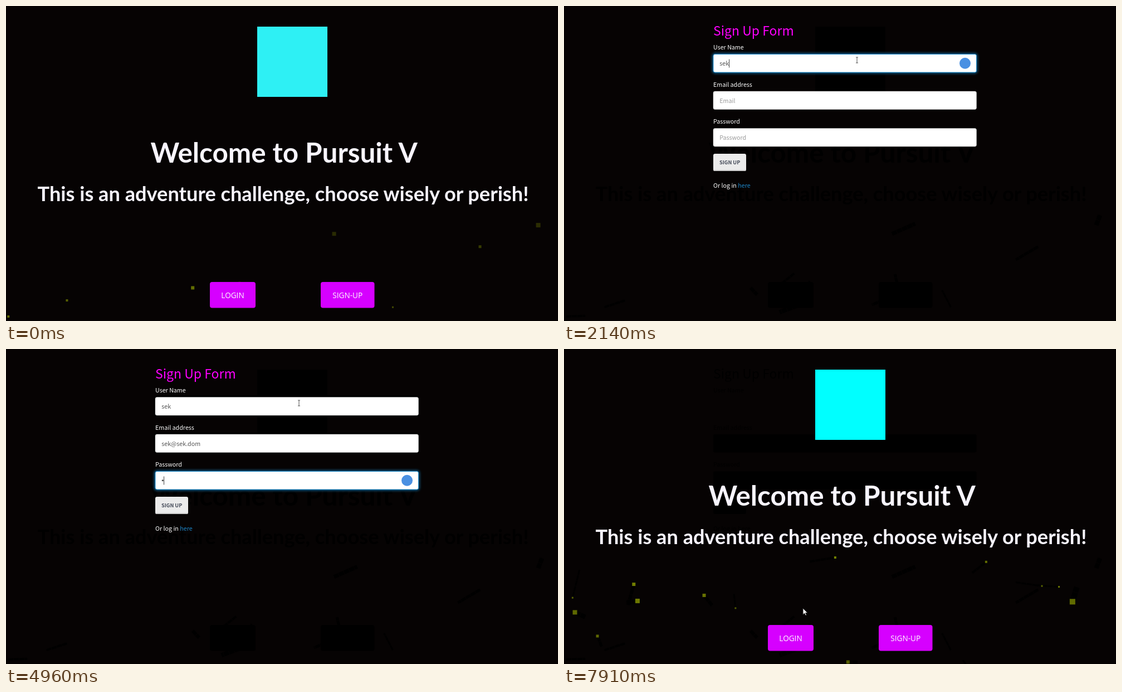
Animation of 991 by 565 pixels, one loop 7990 ms. Source, as an HTML page:

```html
<!DOCTYPE html>
<html lang="en">
<head>
<meta charset="utf-8">
<title>Sign up</title>
<style>
  html, body { margin: 0; width: 100%; height: 100%; overflow: hidden; background: #060303; }
  svg { display: block; width: 100%; height: 100%; }
  .head { font-family: Lato, "Open Sans", sans-serif; font-weight: 700; }
  .btn { font: 500 13.6px "Open Sans", "Noto Sans", sans-serif; text-anchor: middle; }
  .form { font: 10.7px "Noto Sans CJK JP", "Noto Sans CJK SC", "Noto Sans CJK", "Open Sans", sans-serif; }
  .form .title { font-size: 23px; }
  .form .submit { font-size: 9.2px; font-weight: 700; text-anchor: middle; }
</style>
</head>
<body>
<svg id="stage" viewBox="0 0 991 565">
  <defs>
    <clipPath id="sky"><rect y="372" width="991" height="193"/></clipPath>
    <filter id="blur" x="-5%" y="-50%" width="110%" height="200%"><feGaussianBlur stdDeviation="2"/></filter>
  </defs>
</svg>
<script>
const LOOP = 7990, FORM_AT = 900, HOME_AT = 6920;
const stage = document.getElementById('stage');

const set = (node, attrs) => { for (const key in attrs) node.setAttribute(key, attrs[key]); };
const show = (node, on) => node.setAttribute('visibility', on ? 'inherit' : 'hidden');
const clamp = v => Math.max(0, Math.min(1, v));
const mix = (a, b, k) => a + (b - a) * k;
const smooth = k => k * k * (3 - 2 * k);

function el(parent, tag, attrs = {}, text) {
  const node = document.createElementNS('http://www.w3.org/2000/svg', tag);
  set(node, attrs);
  if (text !== undefined) node.textContent = text;
  return parent.appendChild(node);
}

const trails = el(stage, 'g', { 'clip-path': 'url(#sky)', stroke: '#000' });
const ghostHome = el(stage, 'g');
const ghostForm = el(stage, 'g', { class: 'form' });
const specks = el(stage, 'g', { 'clip-path': 'url(#sky)', fill: '#98aa00' });
const homeLayer = el(stage, 'g');
const formLayer = el(stage, 'g', { class: 'form' });

// Landing page; a tint gives its dark afterimage
const loginBox = { x: 366, y: 495, width: 82, height: 46.5, rx: 4 };
const joinBox = { ...loginBox, x: 565, width: 96.5 };

function buildHome(layer, tint) {
  const heading = (x, y, size, text) =>
    el(layer, 'text', { class: 'head', x, y, 'font-size': size, fill: tint || '#f8f5ff' }, text);
  const button = (box, label) => {
    const node = el(layer, 'rect', { ...box, fill: tint || '#d600ff' });
    if (!tint) el(layer, 'text', { class: 'btn', x: box.x + box.width / 2, y: 524, fill: '#fff' }, label);
    return node;
  };
  heading(259.5, 281, 49.4, 'Welcome to Pursuit V');
  heading(56.5, 349.5, 36.2, 'This is an adventure challenge, choose wisely or perish!');
  button(loginBox, 'LOGIN');
  return {
    logo: el(layer, 'rect', { x: 451, y: 37, width: 126, height: 126, fill: tint || '#0ff' }),
    join: button(joinBox, 'SIGN-UP')
  };
}
buildHome(ghostHome, '#000');
const home = buildHome(homeLayer);

// Drifting squares, each leaving a dark trail
function seeded(seed) {
  return () => (seed = seed * 16807 % 2147483647) / 2147483647;
}
function swarm(seed, start, end) {
  const rnd = seeded(seed);
  const items = Array.from({ length: 14 }, () => {
    const size = Math.round(3 + 7 * rnd() ** 2), angle = rnd() * 2 * Math.PI, speed = .012 + .04 * rnd();
    return {
      size, x: rnd() * 991, y: 380 + rnd() * 185, glow: .2 + .45 * rnd(),
      vx: Math.cos(angle) * speed, vy: Math.sin(angle) * speed,
      trail: el(trails, 'line', { 'stroke-width': size, 'stroke-dasharray': '9 1' }),
      dot: el(specks, 'rect', { width: size, height: size })
    };
  });
  return t => {
    const age = Math.min(t, end) - start;
    for (const p of items) {
      const x = p.x + p.vx * age, y = p.y + p.vy * age;
      set(p.trail, { x1: p.x, y1: p.y, x2: x, y2: y });
      set(p.dot, { x: x - p.size / 2, y: y - p.size / 2, opacity: p.glow + age / 4000 });
      show(p.trail, age >= 0);
      show(p.dot, t >= start && t < end);
    }
  };
}
const swarms = [swarm(4711, 0, FORM_AT), swarm(2024, HOME_AT, LOOP)];

// Sign-up form; each burst is [text, time of first key, time per key]
const fields = [
  { label: 'User Name', hint: 'username', on: 1760, off: 2310, bursts: [['sek', 1840, 150]] },
  { label: 'Email address', hint: 'Email', on: 2310, off: 4730,
    bursts: [['sek', 2460, 160], ['@', 3160, 0], ['sek', 3640, 110], ['.dom', 4180, 137]] },
  { label: 'Password', hint: 'Password', on: 4730, off: 6520, secret: true, bursts: [['******', 4960, 172]] }
];
const TEXT_X = 279.3, BULLET = 3.75;

function typed(bursts, t) {
  return bursts.map(([text, start, step]) =>
    t < start ? '' : text.slice(0, 1 + Math.floor((t - start) / (step || 1)))).join('');
}

function buildField(f, i) {
  const y = 86.5 + 66.5 * i, mid = y + 16.3;
  const layer = el(formLayer, 'g');
  f.box = { x: 268, y, width: 472.5, height: 32.5, rx: 3 };
  if (i) el(ghostForm, 'rect', f.box);
  for (const [parent, fill] of [[layer, '#fff'], [ghostForm, '#000']])
    el(parent, 'text', { x: 268, y: y - 8.5, fill }, f.label);
  f.halo = el(layer, 'rect', { ...f.box, stroke: '#000', 'stroke-width': 6 });
  f.glow = el(layer, 'rect', { ...f.box, stroke: '#1f9be8', 'stroke-width': 4, filter: 'url(#blur)' });
  f.edge = el(layer, 'rect', { ...f.box, fill: '#fff' });
  f.value = el(layer, 'text', { x: TEXT_X, y: y + 20.5 });
  f.bullets = el(layer, 'line', { x1: TEXT_X + 1.9, y1: mid, y2: mid, stroke: '#444', 'stroke-width': 3,
    'stroke-linecap': 'round', 'stroke-dasharray': `0 ${BULLET}` });
  f.caret = el(layer, 'rect', { y: y + 9, width: 1, height: 15, fill: '#444' });
  f.badge = el(layer, 'circle', { cx: 720, cy: mid, r: 10, fill: '#4a90e2' });
}
fields.forEach(buildField);

function drawField(f, t) {
  const text = typed(f.bursts, t), n = text.length;
  const focus = t >= f.on && t < f.off;
  f.value.textContent = !n ? f.hint : f.secret ? '' : text;
  set(f.value, { fill: n ? '#555' : '#999' });
  set(f.bullets, { x2: TEXT_X + 2 + BULLET * (n - 1) });
  set(f.caret, { x: TEXT_X + (!n ? 0 : f.secret ? BULLET * n : f.value.getComputedTextLength()) });
  set(f.glow, { opacity: .6 * clamp((t - f.on) / 200) * clamp((f.off + 150 - t) / 150) });
  set(f.edge, { stroke: focus ? '#1f8fd0' : '#ccc', 'stroke-width': focus ? 1 : .5 });
  show(f.bullets, f.secret && n);
  show(f.halo, t >= f.on);
  show(f.caret, focus);
  show(f.badge, focus);
}

const submitBox = { x: 268, y: 265, width: 59, height: 31, rx: 3 };
const submit = el(formLayer, 'rect', submitBox);
el(formLayer, 'rect', { x: 268.5, y: 294, width: 58, height: 2, rx: 1, fill: '#cfcfcf' });
el(formLayer, 'text', { class: 'submit', x: 297.7, y: 283.6, fill: '#444a58' }, 'SIGN UP');
el(ghostForm, 'rect', submitBox);
for (const [layer, title, text, link] of [[formLayer, '#f0f', '#fff', '#1e86c8'], [ghostForm, '#000', '#000', '#000']]) {
  el(layer, 'text', { class: 'title', x: 268, y: 52.5, fill: title }, 'Sign Up Form');
  const line = el(layer, 'text', { x: 268, y: 325.5, fill: text }, 'Or log in ');
  el(line, 'tspan', { fill: link }, 'here');
}

// Pointer: key points [time, x, y]; its shape follows what lies beneath
const SHAPES = {
  arrow: { d: 'M0 0V11.5L2.7 9 4.6 13 6.4 12.2 4.6 8.3H8.2Z', fill: '#fff', stroke: '#222' },
  hand: { d: 'M-1 0Q0-1.6 1 0V5L5.5 6Q7 6.4 6.8 8L6 13H-1.5L-5 8.2Q-4.6 6.6-3 7.6L-1 9Z', fill: '#fff', stroke: '#222' },
  beam: { d: 'M-2-5H2M0-5V5M-2 5H2', fill: 'none', stroke: '#555' }
};
const route = [
  [450, 668, 497], [600, 613, 511], [900, 613, 511], [1060, 589, 373], [1360, 526, 97],
  [6050, 526, 97], [6370, 304, 278], [6700, 304, 278], [6980, 341, 274], [7700, 429, 465], [LOOP, 429, 465]
];
const headline = { x: 260, y: 240, width: 477, height: 50 };
const pointer = el(stage, 'path', { 'stroke-linejoin': 'round' });
const inside = (b, x, y) => x >= b.x && x <= b.x + b.width && y >= b.y && y <= b.y + b.height;

function drawPointer(t, onForm) {
  const i = route.findIndex(r => r[0] > t);
  show(pointer, i > 0);
  if (i < 1) return;
  const [a, b] = [route[i - 1], route[i]], k = smooth((t - a[0]) / (b[0] - a[0]));
  const x = mix(a[1], b[1], k), y = mix(a[2], b[2], k), over = box => inside(box, x, y);
  const buttons = onForm ? [submitBox] : [loginBox, joinBox];
  const texts = onForm ? fields.map(f => f.box) : [headline];
  const kind = buttons.some(over) ? 'hand' : texts.some(over) ? 'beam' : 'arrow';
  set(pointer, { ...SHAPES[kind], transform: `translate(${x} ${y})` });
  set(home.join, { fill: over(joinBox) ? '#f000ff' : '#d600ff' });
  set(submit, { fill: over(submitBox) ? '#dcdcdc' : '#ebebeb' });
}

function draw(t) {
  const onForm = t >= FORM_AT && t < HOME_AT;
  show(homeLayer, !onForm);
  show(formLayer, onForm);
  show(ghostHome, onForm);
  show(ghostForm, t >= HOME_AT);
  swarms.forEach(step => step(t));
  const pulse = clamp((t < FORM_AT ? t : t - HOME_AT) / 650);
  set(home.logo, { fill: `rgb(${mix(46, 0, pulse)},${mix(240, 255, pulse)},${mix(244, 255, pulse)})` });
  set(home.join, { fill: '#d600ff' });
  if (onForm) fields.forEach(f => drawField(f, t));
  drawPointer(t, onForm);
}

function tick(now) {
  draw(now % LOOP);
  requestAnimationFrame(tick);
}
draw(0);
requestAnimationFrame(tick);
</script>
</body>
</html>
```
